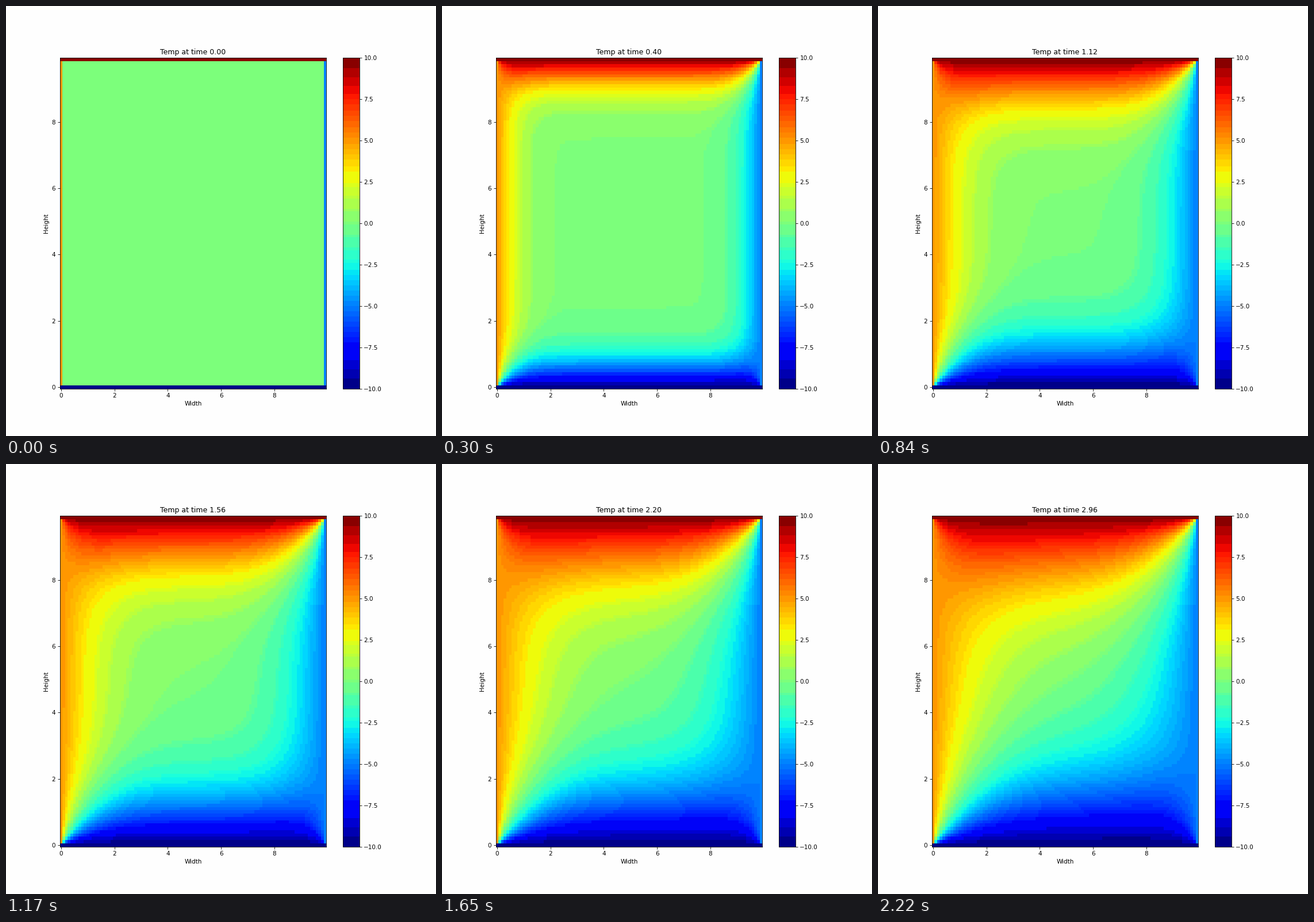
These frames come from a looping animation (748x748 px, 2250 ms). A matplotlib script:

```python
import numpy as np
import matplotlib.pyplot as plt
from matplotlib.animation import FuncAnimation
from matplotlib.colors import ListedColormap

SIZE, INCHES = 748, 10
N, DX = 100, 0.1              # grid points per side, spacing
ALPHA, DT = 1.0, 0.002        # diffusivity, solver time step
LEAD_STEPS = 3                # the solver runs slightly ahead of the clock
FRAMES, INTERVAL = 75, 30
FRAME_TIME = 0.04
T_MIN, T_MAX = -10, 10
PAPER = "#fefefe"


def start_field():
    """Plate at zero with a fixed temperature on each edge."""
    temp = np.zeros((N, N))
    temp[:, 0] = 5
    temp[:, -1] = -5
    temp[0, :] = T_MIN
    temp[-1, :] = T_MAX
    return temp


def advance(temp, steps):
    """Explicit finite-difference steps, in place."""
    r = ALPHA * DT / DX**2
    for _ in range(steps):
        mid = temp[1:-1, 1:-1]
        around = (temp[2:, 1:-1] + temp[:-2, 1:-1]
                  + temp[1:-1, 2:] + temp[1:-1, :-2])
        temp[1:-1, 1:-1] = mid + r * (around - 4 * mid)


def solve():
    """Temperature field for every frame."""
    temp = start_field()
    fields = [temp.copy()]
    advance(temp, LEAD_STEPS)
    for _ in range(FRAMES - 1):
        advance(temp, round(FRAME_TIME / DT))
        fields.append(temp.copy())
    return np.array(fields)


def banded_jet(fields):
    """Jet reduced to coarse RGB buckets, each with its mean colour."""
    rgb = np.rint(plt.get_cmap("jet")(np.arange(256))[:, :3] * 255).astype(int)
    level = ((fields - T_MIN) / (T_MAX - T_MIN) * 256).astype(int).clip(0, 255)
    cell_area, bar_area = 26.7, 64.8
    weight = (np.bincount(level.ravel(), minlength=256) * cell_area
              + bar_area * len(fields))
    _, bucket = np.unique(rgb // [32, 16, 32], axis=0, return_inverse=True)
    bucket = bucket.ravel()
    total = np.bincount(bucket, weight)
    mean = [np.bincount(bucket, weight * rgb[:, c]) / total for c in range(3)]
    return ListedColormap(np.rint(np.stack(mean, axis=1))[bucket] / 255)


fields = solve()
axis = np.arange(N) * DX

fig, ax = plt.subplots(figsize=(INCHES, INCHES), dpi=SIZE / INCHES,
                       facecolor=PAPER)
mesh = ax.pcolormesh(axis, axis, fields[0], cmap=banded_jet(fields),
                     vmin=T_MIN, vmax=T_MAX, shading="nearest")
fig.colorbar(mesh, ax=ax)
ax.set_xlabel("Width")
ax.set_ylabel("Height")
title = ax.set_title("Temp at time 0.00")


def update(i):
    mesh.set_array(fields[i])
    title.set_text(f"Temp at time {i * FRAME_TIME:.2f}")
    return mesh, title


anim = FuncAnimation(fig, update, frames=FRAMES, interval=INTERVAL,
                     repeat=True, repeat_delay=0, blit=False)
plt.show()
```
